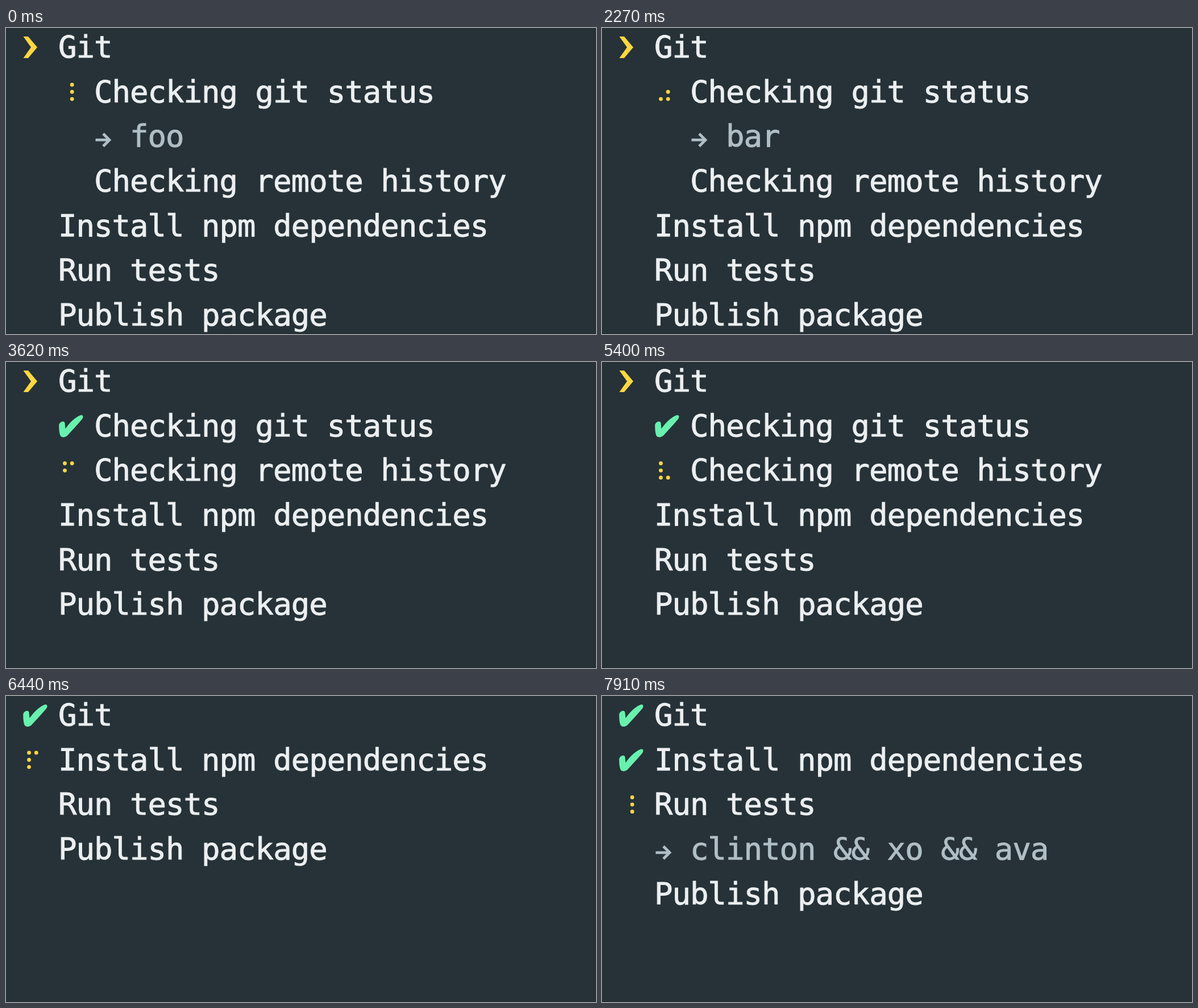
An HTML page for the animation above (8 s loop, 1038 px wide and 539 px high).

```html
<!DOCTYPE html>
<html lang="en">
<head>
<meta charset="utf-8">
<title>Task list</title>
<style>
  html, body { margin: 0; width: 100%; height: 100%; overflow: hidden; background: #263238; }
  svg { display: block; width: 1038px; height: 539px; }
  text {
    font: 54px "DejaVu Sans Mono", "Noto Sans Mono", monospace;
    letter-spacing: -1px;
    white-space: pre;
    fill: #eceff1;
    stroke: #eceff1;
    stroke-width: 0.9;
  }
  .dim { fill: #b0bec5; stroke: #b0bec5; }
  .arrow { fill: none; stroke: #b0bec5; stroke-width: 4.8; }
  .pointer, .spinner { fill: #ffd740; }
  .check { fill: #69f0ae; }
  .edge { fill: #1f292e; }
</style>
</head>
<body>
<svg viewBox="0 0 1038 539">
  <g id="list"></g>
  <rect class="edge" y="538" width="1038" height="1"/>
</svg>
<script>
const LOOP = 8000;
const CELL = 31.5, LEFT = 28.5, LINE = 78.6, BASE = 53;

// The spinner ticks on its own clock; the screen is refreshed more slowly.
const TICK = 103, TICK_START = 49;
const BAR = 15, REMOTE = 34, INSTALL = 53, TESTS = 73;

// Runs of evenly spaced screen refreshes: first, last, count
const REFRESHES = [
  [150, 1070, 7], [1220, 2120, 7], [2270, 3170, 7], [3320, 4360, 8],
  [4510, 5550, 8], [5700, 6740, 8], [6880, 7910, 8]
];
const times = [0];
for (const [first, last, count] of REFRESHES) {
  for (let i = 0; i < count; i++) {
    times.push(Math.round((first + (last - first) * i / (count - 1)) / 10) * 10);
  }
}

const SPINNER = [..."⠋⠙⠹⠸⠼⠴⠦⠧⠇⠏"];

// Marks are drawn relative to the left edge of their cell and the baseline.
const MARKS = {
  pointer: '<path class="pointer" d="M2-38H10.500L26.500-19L10.500 0H2L15.500-19Z"/>',
  check: '<path class="check" d="M1.700-20C1.700-26 11-30 12-24L13-14' +
    'C20-24 30-34 39-37.500C44-39.500 45.500-35 42.500-31' +
    'C34-21 25-11 17-2.500C13 2 6 2 4-2C2-7 1.700-14 1.700-20Z"/>',
  arrow: '<path class="arrow" d="M3-13H27M16.500-24L27.500-13L16.500-2"/>'
};

// Braille dots 1-3 fill the left column, 4-6 the right one.
function spinner(step) {
  const bits = SPINNER[step % SPINNER.length].codePointAt(0) - 0x2800;
  let dots = "";
  for (let i = 0; i < 6; i++) {
    if (bits >> i & 1) {
      const x = i < 3 ? 12 : 24.7;
      const y = -31.7 + 12.6 * (i % 3);
      dots += `<circle class="spinner" cx="${x}" cy="${y}" r="3.4"/>`;
    }
  }
  return dots;
}

const task = (title, mark = "", col = 0) => ({ title, mark, col });
const output = (title, col) => ({ title, mark: MARKS.arrow, col, dim: true });

function rowsAt(tick) {
  const { pointer, check } = MARKS;
  const status = "Checking git status", remote = "Checking remote history";
  const install = "Install npm dependencies";
  const tests = task("Run tests"), publish = task("Publish package");

  if (tick < REMOTE) return [
    task("Git", pointer),
    task(status, spinner(tick + 4), 2),
    output(tick < BAR ? "foo" : "bar", 4),
    task(remote, "", 2),
    task(install), tests, publish
  ];
  if (tick < INSTALL) return [
    task("Git", pointer),
    task(status, check, 2),
    task(remote, spinner(tick - REMOTE), 2),
    task(install), tests, publish
  ];
  if (tick < TESTS) return [
    task("Git", check),
    task(install, spinner(tick - INSTALL)),
    tests, publish
  ];
  return [
    task("Git", check),
    task(install, check),
    task("Run tests", spinner(tick - TESTS)),
    output("clinton &amp;&amp; xo &amp;&amp; ava", 2),
    publish
  ];
}

function drawRow({ title, mark, col, dim }, i) {
  const x = LEFT + col * CELL, y = BASE + i * LINE;
  return `<g transform="translate(${x} ${y})">${mark}` +
    `<text x="${2 * CELL + 0.5}" y="-0.8"${dim ? ' class="dim"' : ""}>${title}</text></g>`;
}

const list = document.getElementById("list");
let shown = -1;

function render(now) {
  const t = now % LOOP;
  const current = times.findLastIndex(start => start <= t);
  if (current !== shown) {
    shown = current;
    const tick = Math.floor((times[current] - TICK_START) / TICK);
    list.innerHTML = rowsAt(tick).map(drawRow).join("");
  }
}

const begin = performance.now();
function loop() {
  render(performance.now() - begin);
  requestAnimationFrame(loop);
}
loop();
</script>
</body>
</html>
```
